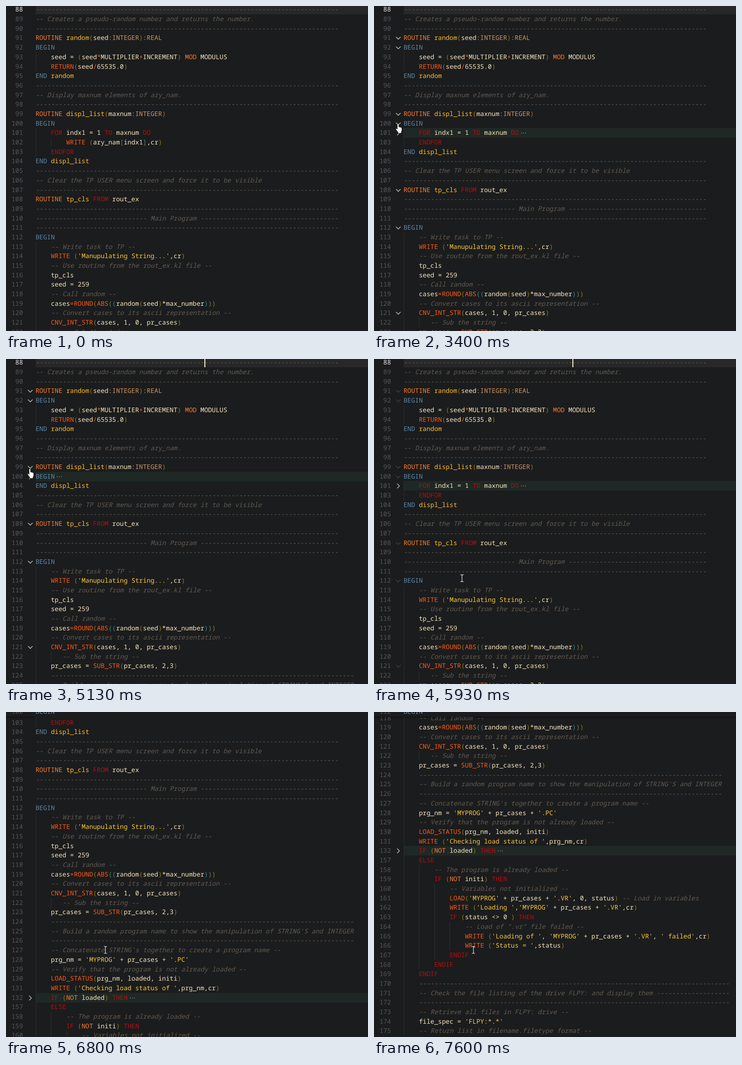
Animation of 790 by 709 pixels, one loop 8000 ms. Source, as an HTML page:

```html
<!DOCTYPE html>
<html lang="en">
<head>
<meta charset="utf-8">
<title>Code folding</title>
<style>
html, body { margin: 0; width: 100%; height: 100%; overflow: hidden; background: #1b1c1d; }
#stage {
  position: relative; width: 790px; height: 709px; overflow: hidden; background: #1b1c1d;
  font: 13.95px/21px "Noto Sans Mono", "DejaVu Sans Mono", monospace;
  font-variant-ligatures: none; text-rendering: geometricPrecision; color: #f8e6c0;
}
.row { position: absolute; left: 0; top: 0; width: 790px; height: 21px; white-space: pre; }
.row > * { position: absolute; top: 0; }
.num { right: 753px; color: #53565a; }
.code { left: 64.5px; }
.fill { left: 65px; right: 0; height: 21px; }
.folded .fill { background: #1f2825; }
.current .fill { background: #282828; }
.current .num { color: #e6e6e6; }
.guide { width: 1px; height: 21px; background: #2d2f31; }
.chev { left: 47px; top: 5px; width: 12px; height: 12px; fill: none; stroke: #cfcabb; stroke-width: 1.3; }
.folded .chev { transform: rotate(-90deg); }
.dots { display: none; color: #85827a; top: 10px; width: 2px; height: 2px; border-radius: 1px;
  background: currentColor; box-shadow: 4.5px 0 currentColor, 9px 0 currentColor; }
.folded .dots { display: block; }
.sticky { background: #1b1c1d; box-shadow: 0 2px 3px #0006; }
.comment { color: #625a52; font-style: italic; }
.string { color: #fcca3c; }
.decl { color: #fb7d2e; }
.name { color: #ffbe2e; }
.type { color: #cf9465; }
.block { color: #5b87aa; }
.flow { color: #b80d10; }
.call { color: #ff5a15; }
.b0 { color: #93791f; } .b1 { color: #4d8a62; } .b2 { color: #3a7f9c; }
#caret { position: absolute; left: 433px; width: 2px; height: 19px; background: #fff3d6; }
#hand, #beam { position: absolute; left: 0; top: 0; overflow: visible; }
</style>
</head>
<body>
<div id="stage">
  <div id="rows"></div>
  <div id="caret"></div>
  <svg id="hand" width="16" height="24"><path transform="translate(-5.6 -1)" fill="#fff" stroke="#111" stroke-width=".8"
    d="M4 13V2.2a1.6 1.6 0 0 1 3.2 0V8q1.5-.8 2.6.5 1.6-.6 2.4.7 1.8-.2 1.8 1.8V15q0 2-1.5 4v2.5h-7v-2L1 13.5q-1-2 .8-2.3 1.2 0 2.2 1.8z"/></svg>
  <svg id="beam" width="8" height="16"><path fill="none" stroke="#eee" stroke-width="1.2"
    d="M-3.5-7.5h2.5l1 1 1-1h2.5M0-6.5v13M-3.5 7.5h2.5l1-1 1 1h2.5"/></svg>
</div>
<script>
const dash = n => '-'.repeat(n);
const rule = dash(79), rule4 = '    ' + rule, rule81 = '    ' + dash(81);

const source = `${rule}
-- Creates a pseudo-random number and returns the number.
${rule}
ROUTINE random(seed:INTEGER):REAL
BEGIN
    seed = (seed*MULTIPLIER+INCREMENT) MOD MODULUS
    RETURN(seed/65535.0)
END random
${rule}
-- Display maxnum elements of ary_nam.
${rule}
ROUTINE displ_list(maxnum:INTEGER)
BEGIN
    FOR indx1 = 1 TO maxnum DO
        WRITE (ary_nam[indx1],cr)
    ENDFOR
END displ_list
${rule}
-- Clear the TP USER menu screen and force it to be visible
${rule}
ROUTINE tp_cls FROM rout_ex
${rule}
${dash(29)} Main Program ${dash(36)}
${rule}
BEGIN
    -- Write task to TP --
    WRITE ('Manupulating String...',cr)
    -- Use routine from the rout_ex.kl file --
    tp_cls
    seed = 259
    -- Call random --
    cases=ROUND(ABS((random(seed)*max_number)))
    -- Convert cases to its ascii representation --
    CNV_INT_STR(cases, 1, 0, pr_cases)
       -- Sub the string --
    pr_cases = SUB_STR(pr_cases, 2,3)
${rule4}
    -- Build a random program name to show the manipulation of STRING'S and INTEGER
${rule4}
    -- Concatenate STRING's together to create a program name --
    prg_nm = 'MYPROG' + pr_cases + '.PC'
    -- Verify that the program is not already loaded --
    LOAD_STATUS(prg_nm, loaded, initi)
    WRITE ('Checking load status of ',prg_nm,cr)
    IF (NOT loaded) THEN
    ELSE
        -- The program is already loaded --
        IF (NOT initi) THEN
            -- Variables not initialized --
            LOAD('MYPROG' + pr_cases + '.VR', 0, status) -- Load in variables
            WRITE ('Loading ','MYPROG' + pr_cases + '.VR',cr)
            IF (status <> 0 ) THEN
                -- Load of ".vr" file failed --
                WRITE ('Loading of ', 'MYPROG' + pr_cases + '.VR', ' failed',cr)
                WRITE ('Status = ',status)
            ENDIF
        ENDIF
    ENDIF
${rule81}
    -- Check the file listing of the drive FLPY: and display them ${dash(19)}
${rule81}
    -- Retrieve all files in FLPY: drive --
    file_spec = 'FLPY:*.*'
    -- Return list in filename.filetype format --`.split('\n');

const classes = {
  decl: 'ROUTINE MOD NOT', type: 'INTEGER REAL', block: 'BEGIN END',
  flow: 'FOR TO DO ENDFOR FROM IF THEN ELSE ENDIF',
  call: 'WRITE RETURN ROUND ABS CNV_INT_STR SUB_STR LOAD LOAD_STATUS'
};
const wordClass = new Map();
for (const c in classes) classes[c].split(' ').forEach(w => wordClass.set(w, c));

const CHAR = 8.37, LINE = 20.69, TOP = -2.6, FRAME = 1000 / 15, LOOP = 8000;
const foldable = [91, 92, 99, 100, 101, 108, 112, 121, 132];

// [line, last hidden line, fold time, unfold time]
const folds = [[99, 104, 4060, 4730], [100, 103, 3595, 5530], [101, 102, 2730, LOOP], [132, 156, 0, LOOP]];
// [line, last line of its block]
const scopes = [[92, 94], [100, 103], [112, 175]];
const wheel = [6265, 6330, 6395, 6465, 6530, 6795, 6865, 6930, 7065, 7395, 7465, 7465, 7595];
const WHEEL_STEP = 45.75;
// [time, x, y] of the pointer
const path = [
  [1266, 680, 686], [1400, 380, 270], [1600, 58, 28], [1866, 41, 278], [2066, 42, 279],
  [2133, 43, 279], [2466, 53, 277], [3000, 53, 277], [3400, 52.5, 257], [3620, 52.5, 257],
  [3866, 52, 233], [5066, 52, 233], [5266, 52, 253], [5600, 52, 253], [5866, 190, 470],
  [5933, 192, 478], [6200, 217, 519]
];

function el(parent, cls, text = '') {
  const node = document.createElement('span');
  node.className = cls;
  node.textContent = text;
  parent.append(node);
  return node;
}

function highlight(parent, text) {
  const token = /--.*$|'[^']*'|\w+|[()[\]]|(?<=\w)[*+\/=](?=\w)|:|[^]/g;
  let depth = 0, last = '';
  for (const [s] of text.matchAll(token)) {
    let cls = '';
    if (s.startsWith('--')) cls = 'comment';
    else if (s[0] === "'") cls = 'string';
    else if ('(['.includes(s)) cls = 'b' + depth++ % 3;
    else if (')]'.includes(s)) cls = 'b' + --depth % 3;
    else if (s === ':') cls = 'type';
    else if (/\w/.test(s)) {
      cls = wordClass.get(s) || (/^(ROUTINE|END)$/.test(last) ? 'name' : '');
      last = s;
    } else if (/[*+\/=]/.test(s) && new RegExp('\\w\\' + s + '\\w').test(text)) cls = 'call';
    el(parent, cls, s);
  }
}

function makeRow(line, text) {
  const node = document.createElement('div');
  node.className = 'row' + (line === 88 ? ' current' : '');
  el(node, 'fill');
  const indent = text.search(/\S/);
  for (let c = 0; c < indent; c += 4) el(node, 'guide').style.left = Math.round(64.7 + c * CHAR) + 'px';
  el(node, 'num', line);
  highlight(el(node, 'code'), text);
  if (foldable.includes(line)) {
    node.insertAdjacentHTML('beforeend', '<svg class="chev" viewBox="-6 -6 12 12"><path d="M-5-2.5 0 2.5 5-2.5"/></svg>');
    el(node, 'dots').style.left = 69.5 + text.length * CHAR + 'px';
  }
  return node;
}

const holder = document.getElementById('rows');
const rows = source.map((text, i) => {
  const line = i < 45 ? 88 + i : 112 + i;
  const node = makeRow(line, text);
  holder.append(node);
  return { line, node, chev: node.querySelector('.chev') };
});
const stickies = scopes.map(([line, end]) => {
  const node = makeRow(line, source[line - 88]);
  node.classList.add('sticky');
  node.querySelector('.chev').remove();
  holder.append(node);
  return { line, end, node };
});
const [caret, hand, beam] = ['caret', 'hand', 'beam'].map(id => document.getElementById(id));

const clamp = v => Math.min(1, Math.max(0, v));
const easeOut = v => 1 - (1 - clamp(v)) ** 2;
const move = (node, x, y) => node.style.transform = `translate(${x}px,${y}px)`;
const show = (node, on) => node.style.visibility = on ? 'visible' : 'hidden';

function pointerAt(t) {
  if (t < path[0][0]) return null;
  const i = path.findIndex(p => p[0] > t);
  if (i < 0) return path.at(-1).slice(1);
  const [t0, x0, y0] = path[i - 1], [t1, x1, y1] = path[i];
  const k = (t - t0) / (t1 - t0);
  return [x0 + (x1 - x0) * k, y0 + (y1 - y0) * k];
}

function render(time) {
  const t = Math.floor((time % LOOP + 4) / FRAME) * FRAME + 0.5;
  const scroll = wheel.filter(w => w <= t).length * WHEEL_STEP;
  const closed = folds.filter(f => t >= f[2] && t < f[3]);
  const hover = easeOut((t - 1600) / 530) * (1 - easeOut((t - 5670) / 500));
  const tops = {};
  let y = TOP - scroll;

  for (const { line, node, chev } of rows) {
    const hidden = closed.some(f => line > f[0] && line <= f[1]);
    const folded = closed.some(f => f[0] === line);
    node.style.display = hidden ? 'none' : '';
    node.classList.toggle('folded', folded);
    tops[line] = y;
    if (chev) chev.style.opacity = folded ? 1 : hover;
    if (hidden) continue;
    move(node, 0, Math.round(y));
    y += LINE;
  }
  for (const { line, end, node } of stickies) {
    const top = Math.min(-11, tops[end]);
    show(node, tops[line] < -11 && top > -21);
    move(node, 0, Math.round(top));
  }

  show(caret, t >= 2730 && Math.floor((t - 2700) / 500) % 2 === 0);
  move(caret, 0, Math.round(TOP - scroll) + 2);

  const p = pointerAt(t);
  const inGutter = p && p[0] < 63;
  show(hand, p && inGutter);
  show(beam, p && !inGutter);
  if (p) move(inGutter ? hand : beam, ...p);
}

function tick() {
  render(performance.now());
  requestAnimationFrame(tick);
}
tick();
</script>
</body>
</html>
```
